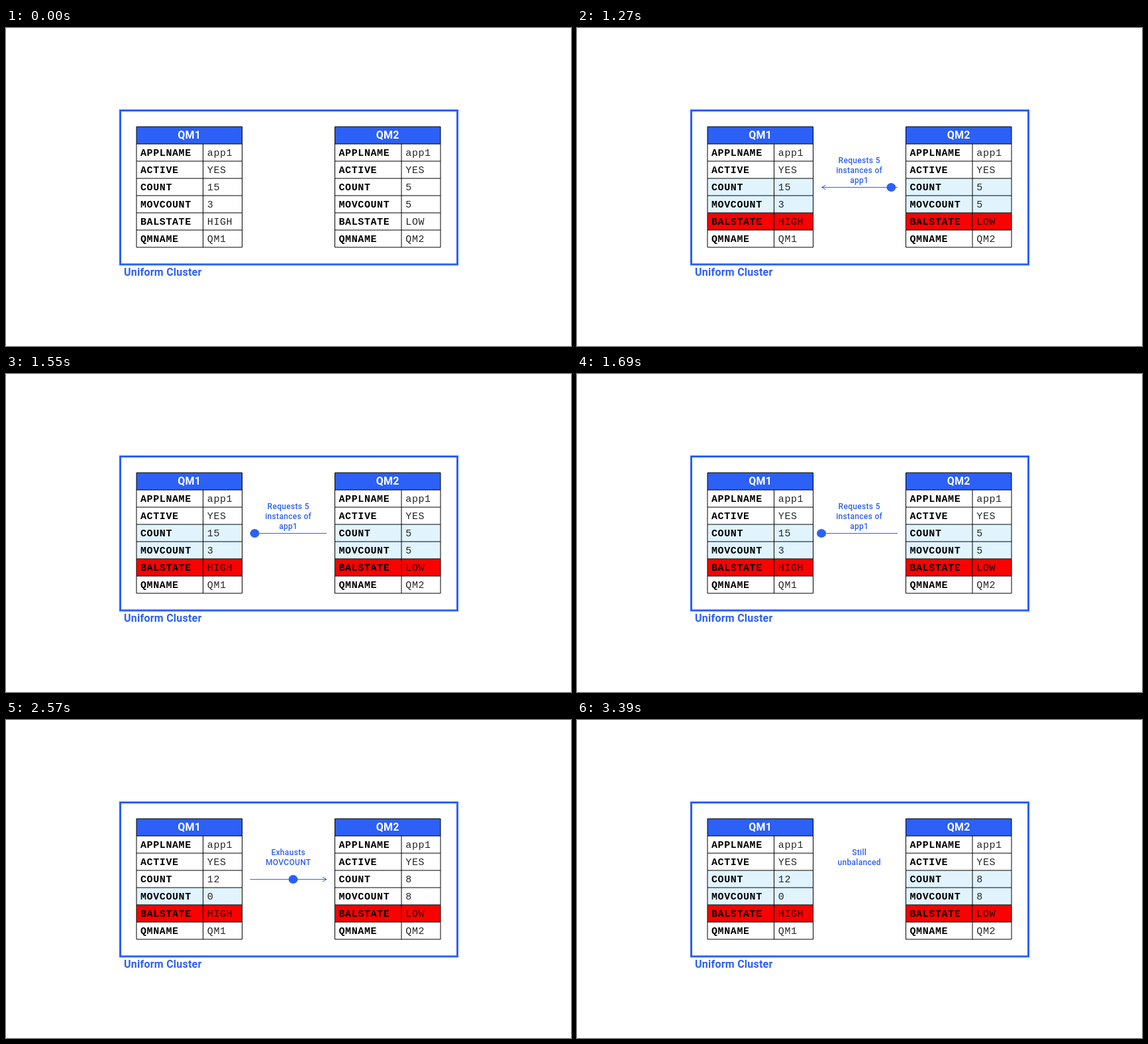
Write an HTML page that moves like this. It is 853x480 px and loops after 4530 ms.

```html
<!DOCTYPE html>
<html lang="en">
<head>
<meta charset="utf-8">
<title>Uniform Cluster</title>
<style>
  html, body { margin: 0; width: 100%; height: 100%; overflow: hidden; background: #fff; }
  svg { display: block; width: 853px; height: 480px; }
  .blue { fill: #2c60f6; }
  .line { fill: none; stroke: #2c60f6; }
  .grid { fill: none; stroke: #000; }
  .title { font: 700 16px Roboto, sans-serif; letter-spacing: .23px; }
  .head { fill: #fff; text-anchor: middle; }
  .cell { font: 15px "Liberation Mono", "Courier New", monospace; letter-spacing: .6px; }
  .key { font-weight: 700; }
  .value { fill-opacity: .85; }
  .note { font: 500 12px Roboto, sans-serif; letter-spacing: .32px; text-anchor: middle; }
  .pale { fill: #e1f4fe; }
  .red { fill: #f00; }
</style>
</head>
<body>
<svg viewBox="0 0 853 480">
  <rect class="line" x="172.5" y="124.5" width="509" height="232.4" stroke-width="3"/>
  <text class="title blue" x="178.1" y="374">Uniform Cluster</text>
  <g id="tables"></g>
  <g id="notes"></g>
  <path id="arrow" class="line"/>
  <ellipse id="ball" class="blue" cy="240.5" rx="7" ry="6.5"/>
</svg>
<script>
const LOOP = 4530, STEP = 70, MOVE = 580;
const TOP = 149, ROW = 26, WIDTH = 159.5, SPLIT = 100.5;
const KEYS = ["APPLNAME", "ACTIVE", "COUNT", "MOVCOUNT", "BALSTATE", "QMNAME"];

// Each table holds its COUNT, its MOVCOUNT and the rows shaded pale.
const scenes = [
  { at: 0, left: [15, 3, []], right: [5, 5, []], note: [] },
  { at: 1070, alert: true, left: [15, 3, [2, 3]], right: [5, 5, [2, 3]],
    note: ["Requests 5", "instances of", "app1"],
    ball: [484, 369], arrow: "M484 240.5H369.5M375.5 237.2L369.5 240.5L375.5 243.8" },
  { at: 2230, alert: true, left: [12, 0, [3]], right: [8, 8, []],
    note: ["Exhausts", "MOVCOUNT"],
    ball: [371.5, 484.3], arrow: "M368.5 240.5H484M478 237.2L484 240.5L478 243.8" },
  { at: 3390, alert: true, left: [12, 0, [2, 3]], right: [8, 8, [2, 3]],
    note: ["Still", "unbalanced"] }
];

const $ = id => document.getElementById(id);
const text = (cls, x, y, s) => `<text class="${cls}" x="${x}" y="${y}">${s}</text>`;
const rect = (cls, x, y) =>
  `<rect class="${cls}" x="${x}" y="${y}" width="${WIDTH}" height="${ROW}"/>`;

function table(x, name, state, [count, moves, pale], alert) {
  const values = ["app1", "YES", count, moves, state, name];
  let out = rect("blue", x, TOP);
  let grid = `M${x} ${TOP}h${WIDTH}v${ROW * 7}h${-WIDTH}z` +
    `M${x + SPLIT} ${TOP + ROW}v${ROW * 6}`;
  KEYS.forEach((key, i) => {
    const y = TOP + ROW * (i + 1);
    const shade = alert && i === 4 ? "red" : pale.includes(i) ? "pale" : "";
    if (shade) out += rect(shade, x, y);
    out += text("cell key", x + 6, y + 18, key) +
      text("cell value", x + 106.8, y + 18, values[i]);
    grid += `M${x} ${y}h${WIDTH}`;
  });
  return out + `<path class="grid" d="${grid}"/>` +
    text("title head", x + WIDTH / 2, 167, name);
}

function show(s) {
  $("tables").innerHTML = table(197, "QM1", "HIGH", s.left, s.alert) +
    table(496.5, "QM2", "LOW", s.right, s.alert);
  $("notes").innerHTML = s.note.map((n, i) => text("note blue", 426.2, 204 + 15 * i, n)).join("");
  $("arrow").setAttribute("d", s.arrow || "");
  $("ball").style.display = s.ball ? "" : "none";
}

const easeInOut = u => u < .5 ? 4 * u ** 3 : 1 - 4 * (1 - u) ** 3;

// The ball rests for 130 ms, then advances in steps and settles at 620 ms.
function progress(t) {
  if (t < 130) return 0;
  const held = 130 + Math.floor((t - 130) / STEP) * STEP;
  return easeInOut(Math.min(1, (held - 40) / MOVE));
}

const start = performance.now();
let current;

function draw() {
  const t = (performance.now() - start) % LOOP;
  const scene = scenes.filter(s => s.at <= t).pop();
  if (scene !== current) show(current = scene);
  if (scene.ball) {
    const [from, to] = scene.ball;
    $("ball").setAttribute("cx", from + (to - from) * progress(t - scene.at));
  }
  requestAnimationFrame(draw);
}
draw();
</script>
</body>
</html>
```
